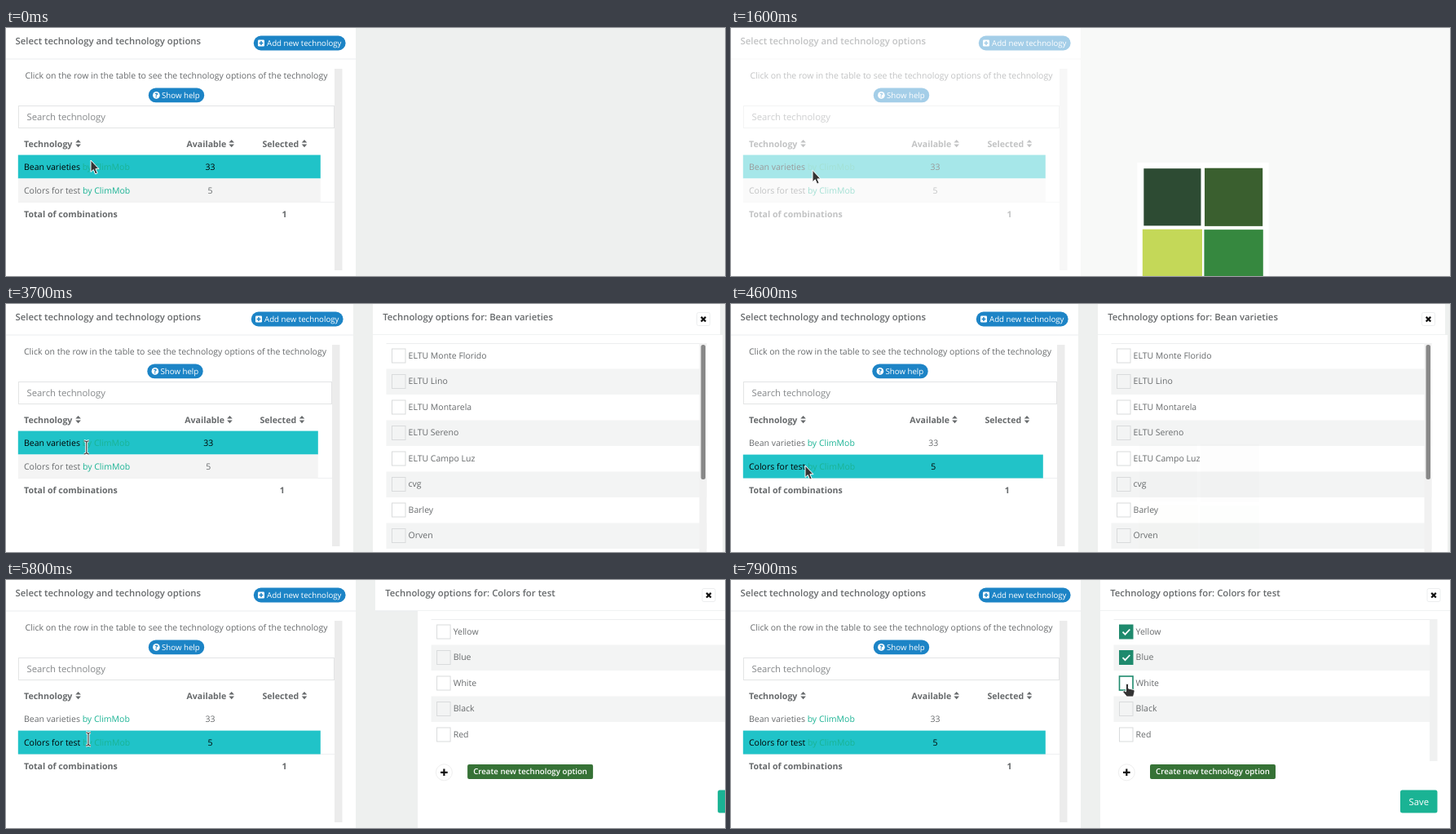
These frames come from a looping animation (882x304 px, 8000 ms). An HTML page:

```html
<!DOCTYPE html>
<html lang="en">
<head>
<meta charset="utf-8">
<title>Technology options</title>
<style>
html, body { margin: 0; width: 100%; height: 100%; overflow: hidden; }
svg { display: block; width: 882px; height: 304px; background: #eef0ef; }
text { font-family: "Open Sans", "Noto Sans", sans-serif; text-rendering: geometricPrecision; white-space: pre; }
</style>
</head>
<body>
<svg id="stage" viewBox="0 0 882 304"></svg>
<script>
const LOOP = 8000;
const GREY = '#676a6c', LINE = '#eceeef', TEAL = '#20c3c8', MINT = '#1ab394', TICK = '#1f8a6d', BLUE = '#1c84c6';
const BEANS = ['ELTU Monte Florido', 'ELTU Lino', 'ELTU Montarela', 'ELTU Sereno', 'ELTU Campo Luz', 'cvg', 'Barley', 'Orven'];
const COLORS = ['Yellow', 'Blue', 'White', 'Black', 'Red'];
const TITLE = { size: 11.36, weight: 600 };
const BOLD = { size: 10.6, weight: 700 };

// time, x, y of the pointer's hot spot
const PATH = [
  [0, 104, 162], [500, 100, 175], [2100, 100, 174], [3300, 99.5, 174], [3650, 99, 175],
  [4100, 91, 198], [5450, 91, 198], [5800, 101, 195], [6350, 101, 195], [6800, 486, 65],
  [7000, 486, 65], [7250, 486, 97], [7550, 486, 97], [7880, 486, 127], [LOOP, 486, 127]
];
// start and end of each loading overlay
const LOADS = [[1000, 1750], [4600, 5100]];

const clamp = v => Math.max(0, Math.min(1, v));

function rect(x, y, w, h, fill, more = '') {
  return `<rect x="${x}" y="${y}" width="${w}" height="${h}" fill="${fill}" ${more}/>`;
}
function path(d, more) {
  return `<path d="${d}" ${more}/>`;
}
// y is the middle of the capitals
function text(s, x, y, { size = 10.5, fill = GREY, weight = 400, anchor = 'start' } = {}) {
  return `<text x="${x}" y="${y + size * 0.36}" font-size="${size}" fill="${fill}" font-weight="${weight}" text-anchor="${anchor}">${s}</text>`;
}

function pointer(t) {
  const i = PATH.findIndex((p, n) => n && t <= p[0]);
  const [t0, x0, y0] = PATH[i - 1], [t1, x1, y1] = PATH[i];
  const u = clamp((t - t0) / (t1 - t0)), e = u * u * (3 - 2 * u);
  return [x0 + (x1 - x0) * e, y0 + (y1 - y0) * e];
}

function cursor(x, y, kind) {
  const beam = 'M-3-8Q0-8 0-6Q0-8 3-8M0-6V6M-3 8Q0 8 0 6Q0 8 3 8';
  const shape = {
    arrow: path('M0 0V14.5L3.3 11.6 5.6 17 8.2 15.9 5.9 10.7H10Z', 'fill="#333" stroke="#fff"'),
    beam: path(beam, 'fill="none" stroke="#fff" stroke-width="3"') +
      path(beam, 'fill="none" stroke="#444" stroke-width="1.2"'),
    hand: path('M-1.5 1Q0-1 1.5 1V6L8 7.5Q9.5 8 9 10L7.5 16H-.5L-5 10.5Q-5.5 8.5-3.5 8.8L-1.5 10Z',
      'fill="#333" stroke="#fff" stroke-width=".9"')
  }[kind];
  return `<g transform="translate(${x} ${y})">${shape}</g>`;
}

function sortIcon(x) {
  return path(`M${x} 140.6h6.6l-3.3-3.6zM${x} 142.6h6.6l-3.3 3.6z`, `fill="${GREY}"`);
}

function tableRow(name, count, y, mid, width, active, stripe) {
  const fill = active ? '#000' : GREY;
  return rect(14.8, y, width, 28.9, active ? TEAL : stripe) +
    text(`${name} <tspan fill="${MINT}">by ClimMob</tspan>`, 22, y + 14.4, { fill }) +
    text(count, mid, y + 14.4, { fill, anchor: 'middle' });
}

function leftPanel(d, selected) {
  const white = { size: 9.7, fill: '#fff' };
  const mid = 250.5 + d * 0.75, sel = 341.5 + d * 0.9;
  const help = 209 + d / 2;
  return rect(0, 0, 429 + d, 304, '#fff') + rect(0, 37.5, 429 + d, 1, LINE) +
    text('Select technology and technology options', 11.5, 16, TITLE) +
    rect(303.8 + d, 9.6, 112.8, 17.8, BLUE, 'rx="8.9"') +
    rect(309 + d, 14.5, 8, 8, '#fff', 'rx="1.3"') +
    path(`M${310.5 + d} 18.5h5M${313 + d} 16v5`, `stroke="${BLUE}" stroke-width="1.5"`) +
    text('Add new technology', 320 + d, 18.5, white) +
    text('Click on the row in the table to see the technology options of the technology', help, 58, { anchor: 'middle' }) +
    rect(help - 34.2, 73.5, 68.4, 17.8, BLUE, 'rx="8.9"') +
    `<circle cx="${help - 24.6}" cy="82.4" r="4.3" fill="#fff"/>` +
    text('?', help - 24.6, 82.4, { size: 7.5, fill: BLUE, weight: 800, anchor: 'middle' }) +
    text('Show help', help - 18, 82.4, white) +
    rect(15.5, 95.5, 387 + d, 27, '#fff', 'stroke="#e3e4e5"') +
    text('Search technology', 25.5, 109, { size: 11.3, fill: '#85888a' }) +
    rect(403 + d, 50, 9.5, 247, '#ececec') +
    text('Technology', 22, 142, BOLD) + sortIcon(85.3) +
    text('Available', 221.5 + d * 0.75, 142, BOLD) + sortIcon(273.4 + d * 0.75) +
    text('Selected', 314.5 + d, 142, BOLD) + sortIcon(362.7 + d) +
    rect(15, 213, 388 + d, 1, '#eff0f1') +
    tableRow('Bean varieties', 33, 155.6, mid, 371 + d, selected === 0, '#fff') +
    tableRow('Colors for test', 5, 184.6, mid, 371 + d, selected === 1, '#f4f4f4') +
    text('Total of combinations', 22, 228.4, BOLD) +
    text('1', sel, 228.4, { ...BOLD, anchor: 'middle' });
}

function checkbox(x, y, checked, hover) {
  return rect(x + 0.5, y + 0.5, 16.5, 17, checked ? TICK : hover ? '#fff' : 'none',
      `stroke="${checked || hover ? TICK : '#d9dbdc'}" stroke-width="${hover ? 1.6 : 1}"`) +
    (checked ? path(`M${x + 4.5} ${y + 9.2}l3 3 5.8-6.2`, 'fill="none" stroke="#fff" stroke-width="1.8"') : '');
}

function optionList(names, x, t, beans) {
  const left = x + 16.5, width = beans ? 393 : 396;
  let out = rect(x, 38, 429, 266, '#fff');
  names.forEach((name, i) => {
    const y = 48 + i * 31.5;
    const checked = !beans && (i === 0 && t >= 6950 || i === 1 && t >= 7280);
    const hover = !beans && !checked && (i === 0 && t >= 6750 || i === 1 && t >= 7150 || i === 2 && t >= 7800);
    if (i % 2) out += rect(left, y, width, 31.5, '#f3f4f4');
    out += checkbox(x + 23, y + 6.5, checked, hover) + text(name, x + 43.6, y + 15);
  });
  out += rect(left, 48, width, 1, LINE);
  if (beans) {
    return out + rect(x + 400.5, 48, 9, 256, '#f1f1f1') + rect(x + 402.5, 50, 5.5, 165, '#888', 'rx="2.5"');
  }
  return out + rect(x + 404, 48, 9.5, 174, '#f0f1f1') +
    `<circle cx="${x + 32.3}" cy="235.8" r="10" fill="#fff" stroke="#eee"/>` +
    path(`M${x + 28} 235.8h8.6M${x + 32.3} 231.5v8.6`, 'stroke="#111" stroke-width="2.2"') +
    rect(x + 61, 226, 154, 18, '#367236', 'rx="2"') +
    text('Create new technology option', x + 138, 235, { size: 9.7, fill: '#fff', weight: 600, anchor: 'middle' }) +
    rect(x + 368, 257.5, 45.5, 28, MINT, 'rx="2.5"') +
    text('Save', x + 390.8, 271.5, { size: 11.3, fill: '#fff', anchor: 'middle' });
}

function rightPanel(t, d) {
  const beans = t < 5100, x = 453 + d;
  const p = clamp((t - (beans ? 1846 : 5225)) / 1000);
  const slide = 1612 * (1 - p) ** 4;
  const bx = x + 409 - (d ? 3.5 : 0);
  return rect(x, 0, 429 + d, 37.5, '#fff') + rect(x, 37.5, 429 + d, 1, LINE) +
    text(`Technology options for: ${beans ? 'Bean varieties' : 'Colors for test'}`, x + 12.2, 16, TITLE) +
    rect(bx - 8, 10.5, 16, 16, '#fff', `rx="2" stroke="${LINE}"`) +
    path(`M${bx - 2.8} 15.9l5.6 5.6m0-5.6l-5.6 5.6`, 'stroke="#111" stroke-width="2.2"') +
    (slide < 450 ? optionList(beans ? BEANS : COLORS, x + slide, t, beans) : '');
}

function loader(t, [start], cx) {
  const s = (t - start) / 1000;
  const base = 69 + 3 * Math.sin((s - 0.5) * 2.5 * Math.PI);
  let out = rect(0, 0, 882, 304, '#fff', 'opacity=".6"') + rect(cx - 80.5, 165, 161, 161, '#fff');
  ['#2d4b33', '#3a5f2f', '#c4d858', '#36883f'].forEach((fill, i) => {
    const size = base + [-1, 0, 2, 1.2][i];
    const x = cx + (i % 2 ? 37.6 : -37.6), y = 245 + (i > 1 ? 38.3 : -37.7);
    out += rect(x - size / 2, y - size / 2, size, size, fill);
  });
  return `<g opacity="${clamp(s / 0.2)}">${out}</g>`;
}

function render(t) {
  const d = t >= 1750 && t < 5500 ? -3 : 0;
  const load = LOADS.find(([a, b]) => t >= a && t < b);
  const [x, y] = pointer(t);
  const overText = x < 152 && t > 150;
  const kind = load ? 'arrow' : t >= 6750 ? 'hand' : overText ? 'beam' : 'arrow';
  return leftPanel(d, t < 3850 ? 0 : 1) +
    (t >= 1750 ? rightPanel(t, d) : '') +
    (load ? loader(t, load, d ? 574 : 579) : '') +
    cursor(x, y, kind);
}

const stage = document.getElementById('stage');
function frame() {
  stage.innerHTML = render(performance.now() % LOOP);
  requestAnimationFrame(frame);
}
frame();
</script>
</body>
</html>
```
